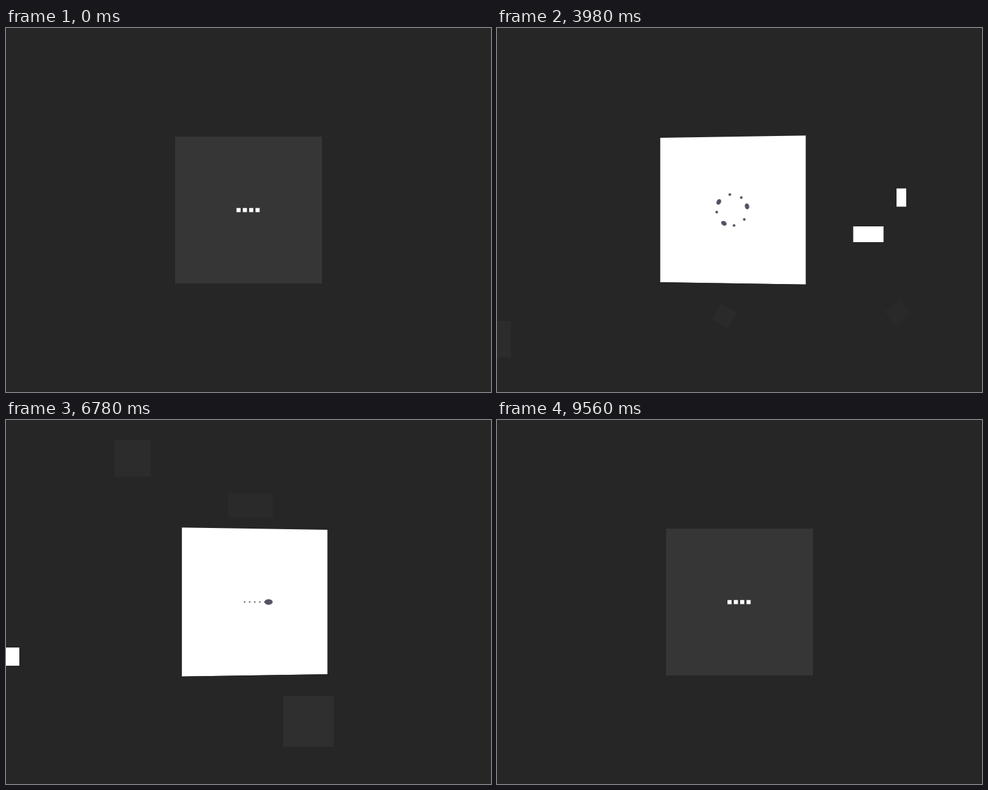
An HTML page with a canvas that plays this animation: 800x600 px, repeating every 9600 ms.

```html
<!DOCTYPE html>
<html lang="en">
<head>
<meta charset="utf-8">
<title>Loader cube</title>
<style>
  html, body { margin: 0; width: 100%; height: 100%; overflow: hidden; background: #262626; }
  #stage { position: relative; width: 800px; height: 600px; overflow: hidden; perspective: 800px; }
  #field { position: absolute; left: 0; top: 0; }
  #cube { position: absolute; left: 279px; top: 179px; width: 242px; height: 242px; transform-style: preserve-3d; }
  #cube canvas { position: absolute; left: 0; top: 0; backface-visibility: hidden; }
</style>
</head>
<body>
<div id="stage">
  <canvas id="field" width="800" height="600"></canvas>
  <div id="cube"></div>
</div>
<script>
const LOOP = 9600, FACE = 242, TAU = Math.PI * 2;
const TURN_START = 1375, TURN_EVERY = LOOP / 4, TURN_TIME = 810;
const field = document.getElementById('field').getContext('2d');
const cube = document.getElementById('cube');

const clamp = v => Math.max(0, Math.min(1, v));
const mix = (a, b, u) => a + (b - a) * u;
const smooth = u => u * u * (3 - 2 * u);
const cubic = u => u < 0.5 ? 4 * u ** 3 : 1 - 4 * (1 - u) ** 3;

// Shapes pass (x, y) at time `at` with a steady speed in px/ms and spin in deg/ms.
const squares = [
  { at: 2600, x: 225.5, y: 91.5, size: 40 },
  { at: 2600, x: 569.5, y: 463, size: 32 },
  { at: 3833, x: 9.2, y: 513, size: 60, vx: -.11 },
  { at: 4161, x: 590.6, y: 470, size: 31, vx: -.389, spin: -.795 },
  { at: 4370, x: 200.5, y: 475, size: 31, vx: -.45, spin: -.077 },
  { at: 5600, x: 254.7, y: 63.5, size: 60, vx: -.039 },
  { at: 5600, x: 617, y: 497, size: 83.5, vx: -.1 },
  { at: 6780, x: 404, y: 141.5, size: 40, width: 74, vx: -.557 },
  { at: 8200, x: 225.5, y: 141.5, size: 40 }
];
const sparks = [
  { at: 3980, x: 667, y: 280, size: 30, width: 16, vy: -.5 },
  { at: 3980, x: 611.8, y: 340, size: 26, width: 50, vx: .78 },
  { at: 5180, x: 650, y: 63, size: 23, width: 8, vy: .6, round: 4 },
  { at: 5180, x: 672, y: 447, size: 18, width: 11, vx: -.44, vy: .44, tilt: 28, round: 5.5 },
  { at: 6780, x: 8, y: 390, size: 30, vx: -1 },
  { at: 8320, x: 170.5, y: 477, size: 66.5 },
  { at: 8320, x: 167, y: 164, size: 76, width: 6, vy: 1.36, round: 3 }
];

function drawShape(shape, t, halfLife, alphaAtAge) {
  const { at, x, y, size, width = size, vx = 0, vy = 0, spin = 0, tilt = 0, round = 0 } = shape;
  const dt = t - at;
  if (Math.abs(dt) > halfLife) return;
  field.save();
  field.globalAlpha = alphaAtAge(dt + halfLife, size) * clamp((halfLife - dt) / 80);
  field.translate(x + vx * dt, y + vy * dt);
  field.rotate((tilt + spin * dt) * Math.PI / 180);
  field.beginPath();
  field.roundRect(-width / 2, -size / 2, width, size, round);
  field.fill();
  field.restore();
}

// Squares are born white and cool down; larger ones stay a little lighter.
const cooling = (age, size) => mix(size * .0005, 1, Math.exp(-age / 150));
const steady = () => 1;

function blob(c, x, y, rx, ry = rx, turn = 0) {
  c.beginPath();
  c.ellipse(x, y, rx, ry, turn, 0, TAU);
  c.fill();
}

function jumpingSquares(c, t) {
  c.fillStyle = '#fff';
  for (let i = 0; i < 4; i++) {
    const s = Math.sin(TAU * smooth(clamp((t % 955 - i * 70) / 650)));
    c.fillRect(-19.8 + i * 10.45, -3.3 + s * (s > 0 ? 17.5 : 20.5), 6.8, 6.8);
  }
}

function dotRing(c, t) {
  const turn = (t - 2620) / 1360;
  for (let i = 0; i < 8; i++) {
    const big = [1, 3, 6].includes(i);
    const degrees = -82 + i * 45 + (big ? 5.3 + turn * 153 : turn * 164);
    const a = degrees * Math.PI / 180;
    c.fillStyle = big ? '#525062' : '#555158';
    blob(c, 25.7 * Math.cos(a), 25.7 * Math.sin(a), big ? 3.6 : 2.2, big ? 4.9 : 2.2, a);
  }
}

function orbitingDots(c, t) {
  c.fillStyle = '#fff';
  [Math.PI, 1.5, 1.39, -.4].forEach((phase, i) => {
    const a = phase + (t - 5180) / 1200 * TAU;
    blob(c, 14 * Math.cos(a), (i === 1 ? 3 : 5) * Math.sin(a), 3.6);
  });
}

function gooeyDrops(c, t) {
  const swing = period => Math.cos((t - 6780) / period * TAU);
  const drops = [[22 * swing(1027), 4.2], [21 * swing(1540), 4.6]];
  for (let i = 0; i < 6; i++) {
    const x = -21 + i * 8.4 + 2.4 * swing(1027);
    c.fillStyle = '#77747c';
    blob(c, x, 0, 1.4);
    c.fillStyle = '#535466';
    for (const [dx, r] of drops) {
      if (Math.abs(dx - x) > 9) continue;
      c.beginPath();
      c.moveTo(x, -1.4);
      c.quadraticCurveTo(mix(x, dx, .5), -r * .8, dx, -r);
      c.lineTo(dx, r);
      c.quadraticCurveTo(mix(x, dx, .5), r * .8, x, 1.4);
      c.fill();
    }
  }
  c.fillStyle = '#535466';
  for (const [x, r] of drops) blob(c, x, 0, r + 1.8, r);
}

const faces = [
  ['#363636', jumpingSquares],
  ['#fff', dotRing],
  ['#363636', orbitingDots],
  ['#fff', gooeyDrops]
].map(([color, draw], i) => {
  const canvas = document.createElement('canvas');
  canvas.width = canvas.height = FACE;
  canvas.style.transform = `rotateY(${i * 90}deg) translateZ(${FACE / 2}px)`;
  cube.append(canvas);
  return { color, draw, c: canvas.getContext('2d') };
});

function render() {
  const t = performance.now() % LOOP;

  field.clearRect(0, 0, 800, 600);
  field.fillStyle = '#fff';
  for (const shape of squares) drawShape(shape, t, 1300, cooling);
  for (const shape of sparks) drawShape(shape, t, 450, steady);

  let angle = 0;
  for (let i = 0; i < faces.length; i++) {
    angle += 90 * cubic(clamp((t - TURN_START - i * TURN_EVERY) / TURN_TIME));
  }
  cube.style.transform = `translateZ(${-FACE / 2}px) rotateY(${-angle}deg)`;

  for (const { color, draw, c } of faces) {
    c.setTransform(1, 0, 0, 1, 0, 0);
    c.fillStyle = color;
    c.fillRect(0, 0, FACE, FACE);
    c.translate(FACE / 2, FACE / 2);
    draw(c, t);
  }
  requestAnimationFrame(render);
}
render();
</script>
</body>
</html>
```
